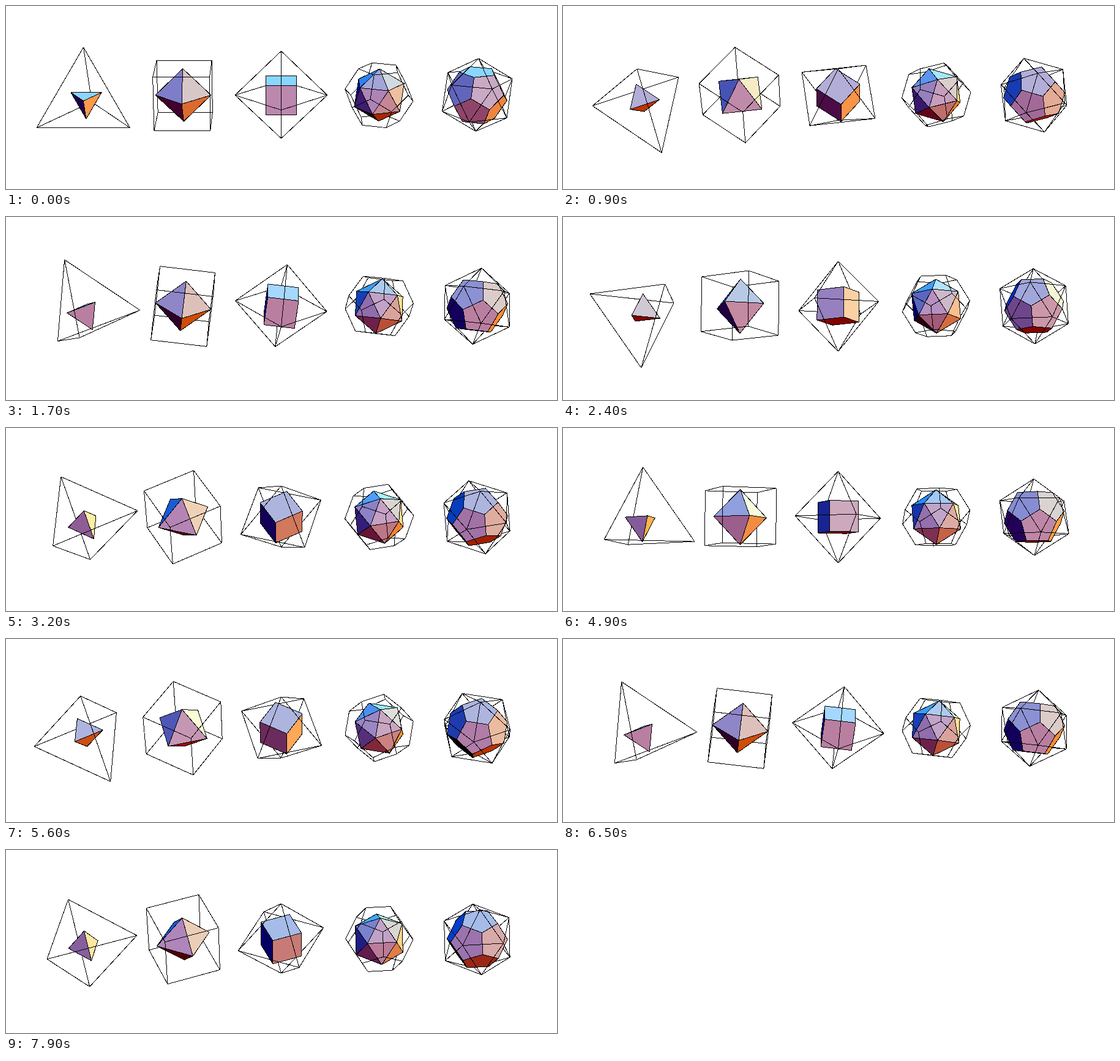
Recreate the animation shown at these times as an HTML page. Size 900 px wide and 300 px high, loop 8000 ms.

```html
<!DOCTYPE html>
<html lang="en">
<head>
<meta charset="utf-8">
<title>Platonic solids and their duals</title>
<style>
  html, body { margin: 0; width: 100%; height: 100%; overflow: hidden; background: #fff; }
  svg { display: block; width: 900px; height: 300px; }
  path { stroke: #000; stroke-width: 1; stroke-linejoin: round; shape-rendering: crispEdges; }
</style>
</head>
<body>
<svg id="stage" viewBox="0 0 900 300"></svg>
<script>
const stage = document.getElementById('stage');
const CX = 449.5, CY = 146.1, EYE = 2800;
const LOOP = 8000, HOLD = 400, STEP = 100, TURN = 48;
const SIN = Math.sqrt(0.1), COS = Math.sqrt(0.9); // camera elevation

const dot = (a, b) => a[0] * b[0] + a[1] * b[1] + a[2] * b[2];
const sub = (a, b) => a.map((v, i) => v - b[i]);
const scale = (a, k) => a.map(v => v * k);
const cross = (a, b) => [
  a[1] * b[2] - a[2] * b[1],
  a[2] * b[0] - a[0] * b[2],
  a[0] * b[1] - a[1] * b[0]
];
const unit = a => scale(a, 1 / Math.hypot(...a));

// Points on a unit sphere: n of them at height z, starting at the given angle
const ring = (n, z, start) => Array.from({ length: n }, (_, i) => {
  const a = (start + i * 360 / n) * Math.PI / 180, r = Math.sqrt(1 - z * z);
  return [r * Math.cos(a), r * Math.sin(a), z];
});

// Outward unit normals of all hull faces, with the vertices on each
function hull(verts) {
  const faces = [];
  for (let i = 0; i < verts.length; i++)
    for (let j = i + 1; j < verts.length; j++)
      for (let k = j + 1; k < verts.length; k++) {
        let n = unit(cross(sub(verts[j], verts[i]), sub(verts[k], verts[i])));
        if (dot(n, verts[i]) < 0) n = scale(n, -1);
        const d = dot(n, verts[i]);
        if (verts.some(v => dot(v, n) > d + 1e-6)) continue;
        if (faces.some(f => dot(f.n, n) > 1 - 1e-6)) continue;
        const ids = verts.map((_, m) => m).filter(m => dot(verts[m], n) > d - 1e-6);
        faces.push({ n, d, ids });
      }
  return faces;
}

function around(axis, points) {
  const u = unit(sub(points[0], scale(axis, dot(points[0], axis)))), w = cross(axis, u);
  const angle = p => Math.atan2(dot(p, w), dot(p, u));
  return [...points].sort((a, b) => angle(a) - angle(b));
}

// A wire solid with its dual spanned between the face centres
function makeSolid(verts, radius, x, z = 0) {
  const faces = hull(verts);
  const edges = [];
  verts.forEach((a, i) => verts.forEach((b, j) => {
    if (j <= i) return;
    const shared = faces.filter(f => f.ids.includes(i) && f.ids.includes(j));
    if (shared.length === 2)
      edges.push({ ends: [scale(a, radius), scale(b, radius)], shared });
  }));
  const dual = verts.map((v, i) => ({
    n: v,
    points: around(v, faces.filter(f => f.ids.includes(i)).map(f => scale(f.n, f.d * radius)))
  }));
  return { radius, faces, edges, dual, at: toView([x, 0, z]) };
}

// World to view axes: right, up, toward the viewer
function toView([x, y, z]) {
  return [x, y * SIN + z * COS, z * SIN - y * COS];
}

function spinner(angle) {
  const c = Math.cos(angle), s = Math.sin(angle);
  return ([x, y, z]) => {
    const p = x * c + y * s, q = y * c - x * s;
    return toView([p, q * c - z * s, q * s + z * c]);
  };
}

function project([r, u, t]) {
  const k = 1 / (1 - t / EYE);
  return (CX + r * k).toFixed(2) + ' ' + (CY - u * k).toFixed(2);
}

// Red light from the right, blue from above, green from both
function shade([r, u, t]) {
  const side = 0.73 - 0.58 * t, base = 0.445 + 0.31 * t;
  const rgb = [base + r * side, 0.4 + 0.2 * t + (r + u) * (0.51 - 0.36 * t), base + u * side];
  return 'rgb(' + rgb.map(v => Math.round(255 * Math.min(1, Math.max(0, v)))) + ')';
}

const icosa = [[0, 0, 1], ...ring(5, Math.sqrt(0.2), 0), ...ring(5, -Math.sqrt(0.2), 36), [0, 0, -1]];
const dodeca = hull(icosa).map(f => f.n);
const octa = [...ring(4, 0, 0), [0, 0, 1], [0, 0, -1]];
const cube = [...ring(4, Math.sqrt(1 / 3), 45), ...ring(4, -Math.sqrt(1 / 3), 45)];
const tetra = [[0, 0, 1], ...ring(3, -1 / 3, 90)];

const solids = [
  makeSolid(tetra, 92.4, -320, -10.5),
  makeSolid(cube, 78.8, -160),
  makeSolid(octa, 75.4, 0),
  makeSolid(dodeca, 56.8, 160),
  makeSolid(icosa, 62.9, 320)
];

function drawSolid(solid, spin) {
  const place = p => spin(p).map((v, i) => v + solid.at[i]);
  const facing = (n, p) => dot(n, sub([0, 0, EYE], p)) > 0;
  const line = points => 'M' + points.map(p => project(place(p))).join('L');

  const front = new Set(solid.faces.filter(f =>
    facing(spin(f.n), place(scale(f.n, f.d * solid.radius)))));
  const wires = ['', ''];
  for (const e of solid.edges)
    wires[e.shared.some(f => front.has(f)) ? 1 : 0] += line(e.ends);

  let core = '';
  for (const f of solid.dual) {
    const n = spin(f.n);
    if (facing(n, place(f.points[0])))
      core += `<path d="${line(f.points)}Z" fill="${shade(n)}"/>`;
  }
  const wire = d => `<path d="${d}" fill="none"/>`;
  return wire(wires[0]) + core + wire(wires[1]);
}

let shown = -1;
function render(ms) {
  const step = Math.max(0, Math.floor((ms % LOOP - HOLD) / STEP));
  if (step === shown) return;
  shown = step;
  const spin = spinner(step * 2 * Math.PI / TURN);
  stage.innerHTML = solids.map(s => drawSolid(s, spin)).join('');
}

function tick() {
  render(performance.now());
  requestAnimationFrame(tick);
}
tick();
</script>
</body>
</html>
```
